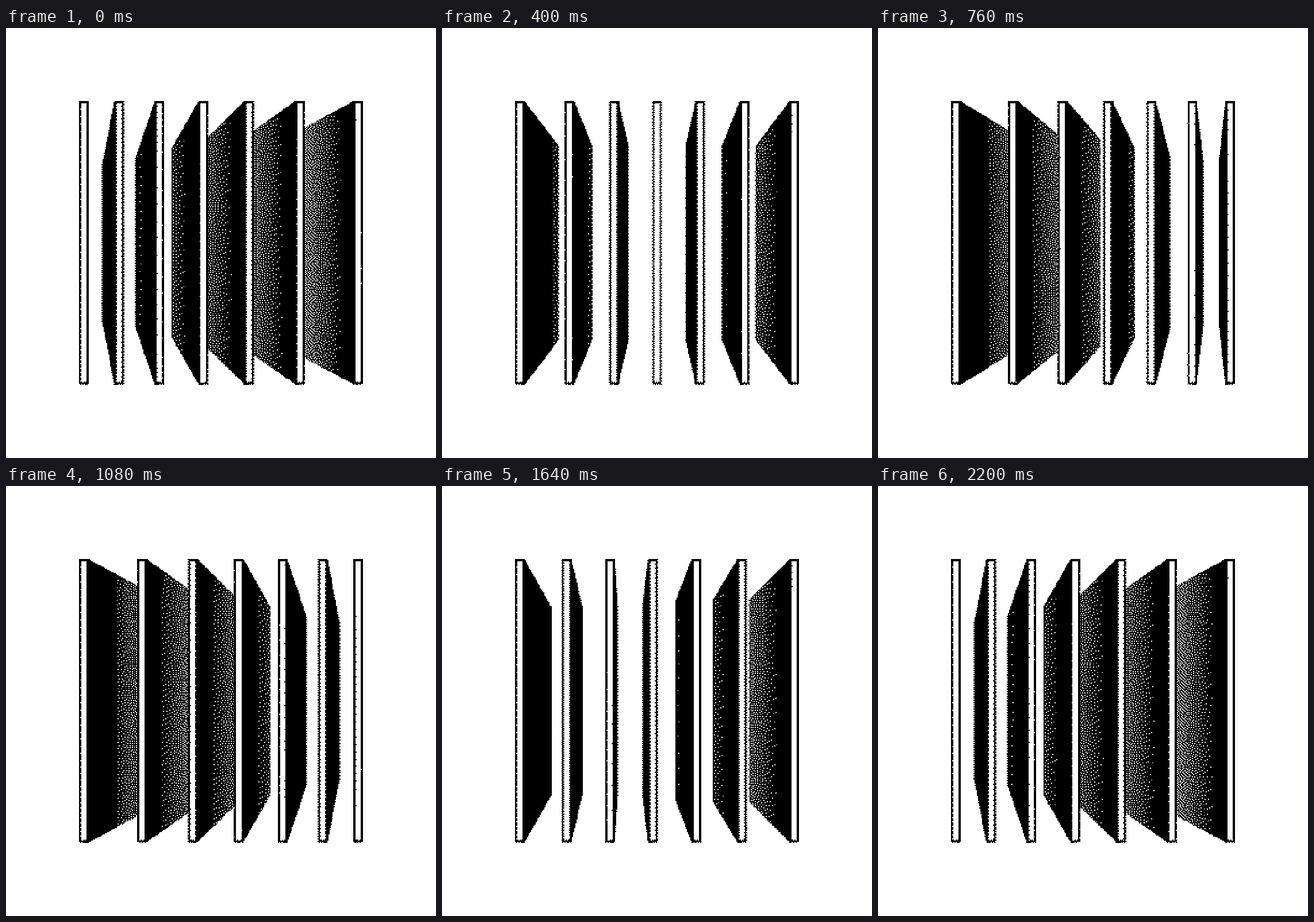
These frames come from a looping animation (748 px wide and 748 px high, 2.24 s). An HTML page with a canvas:

```html
<!DOCTYPE html>
<html lang="en">
<head>
<meta charset="utf-8">
<title>Slats</title>
<style>
  html, body { margin: 0; width: 100%; height: 100%; overflow: hidden; background: #fff; }
  canvas { display: block; width: 748px; height: 748px; image-rendering: pixelated; }
</style>
</head>
<body>
<canvas id="stage" width="400" height="400"></canvas>
<script>
const GRID = 400, STAGE = 748, CELL = STAGE / GRID;
const PERIOD = 2240, HALF = PERIOD / 2, STEP = 40;
const EDGE = 68, MID = STAGE / 2, TOP = EDGE * CELL, BOTTOM = 331.5 * CELL;
const FRONT_HALF = 8.2, BACK_HALF = 7, LINE = 3.5;

const ctx = document.getElementById('stage').getContext('2d', { willReadFrequently: true });

// Front and back centre of each slat: [rest, sway, skew], offset = rest + sway*s + skew*s*s
const leftSlats = [
  { front: [-238.8, 0, 0], back: [-178, 50, -9] },
  { front: [-152.3, 20, -5], back: [-119.5, 70, -10] },
  { front: [-75, 29, -3], back: [-57, 80, -5] }
];
const flip = ([rest, sway, skew]) => [-rest, sway, -skew];
const slats = [
  ...leftSlats,
  { front: [0, 31, 0], back: [0, 79, 0] },
  ...leftSlats.map(b => ({ front: flip(b.front), back: flip(b.back) })).reverse()
];

const place = ([rest, sway, skew], s) => MID + rest + sway * s + skew * s * s;
const smooth = p => p * p * (3 - 2 * p);

// Viewpoint from -1 (left) to 1 (right), resting briefly in the middle
function viewpoint(time) {
  const sign = time < HALF ? 1 : -1;
  const t = time % HALF, pause = 390;
  if (t < pause) return sign * (smooth(t / pause) - 1);
  const q = (t - pause) / (HALF - pause);
  return sign * smooth(1 - Math.pow(1 - q, 1.9));
}

const shade = depth => Math.min(0.42, 0.0062 * Math.max(0, depth));

function drawSide(x, from, to, backTop, dark) {
  const length = Math.abs(to - from);
  const fill = ctx.createLinearGradient(from, 0, to, 0);
  const stops = 24;
  for (let i = 0; i <= stops; i++) {
    const level = Math.round(255 * shade(length * i / stops - dark));
    fill.addColorStop(i / stops, `rgb(${level},${level},${level})`);
  }
  ctx.fillStyle = fill;
  ctx.beginPath();
  ctx.moveTo(x, TOP);
  ctx.lineTo(from, TOP);
  ctx.lineTo(to, backTop);
  ctx.lineTo(to, STAGE - backTop);
  ctx.lineTo(from, BOTTOM);
  ctx.lineTo(x, BOTTOM);
  ctx.fill();
}

function drawFront(x) {
  ctx.fillStyle = '#000';
  ctx.fillRect(x - FRONT_HALF, TOP, 2 * FRONT_HALF, BOTTOM - TOP);
  ctx.fillStyle = '#fff';
  ctx.fillRect(x - FRONT_HALF + LINE, TOP + 2 * CELL, 2 * (FRONT_HALF - LINE), BOTTOM - TOP - 4 * CELL);
}

// Error diffusion to pure black and white
function diffuse() {
  const image = ctx.getImageData(0, 0, GRID, GRID);
  const data = image.data;
  const gray = new Float32Array(GRID * GRID + GRID + 2);
  for (let i = 0; i < GRID * GRID; i++) gray[i] = data[i * 4];
  for (let i = 0; i < GRID * GRID; i++) {
    const value = gray[i] < 128 ? 0 : 255;
    const error = (gray[i] - value) / 16;
    gray[i + 1] += error * 7;
    gray[i + GRID - 1] += error * 3;
    gray[i + GRID] += error * 5;
    gray[i + GRID + 1] += error;
    data[i * 4] = data[i * 4 + 1] = data[i * 4 + 2] = value;
  }
  ctx.putImageData(image, 0, 0);
}

function draw(time) {
  const s = viewpoint(time);
  ctx.setTransform(1, 0, 0, 1, 0, 0);
  ctx.fillStyle = '#fff';
  ctx.fillRect(0, 0, GRID, GRID);
  ctx.save();
  ctx.beginPath();
  ctx.rect(EDGE, EDGE, GRID - 2 * EDGE, GRID - 2 * EDGE);
  ctx.clip();
  ctx.scale(1 / CELL, 1 / CELL);
  slats.forEach((slat, i) => {
    const x = place(slat.front, s), back = place(slat.back, s);
    const backTop = 205 + 5 * s * s + 30 * s * Math.sin(1.9 * (i - 3) / 3);
    const right = back + BACK_HALF, left = back - BACK_HALF;
    if (right > x + FRONT_HALF) drawSide(x, x + FRONT_HALF, right, backTop, i ? 20 : 38);
    if (left < x - FRONT_HALF) drawSide(x, x - FRONT_HALF, left, backTop, 20);
  });
  slats.forEach(slat => drawFront(place(slat.front, s)));
  ctx.restore();
  diffuse();
}

let start = null, shown = -1;
function tick(now) {
  if (start === null) start = now;
  const time = Math.floor((now - start) % PERIOD / STEP) * STEP;
  if (time !== shown) draw(shown = time);
  requestAnimationFrame(tick);
}
draw(0);
requestAnimationFrame(tick);
</script>
</body>
</html>
```
